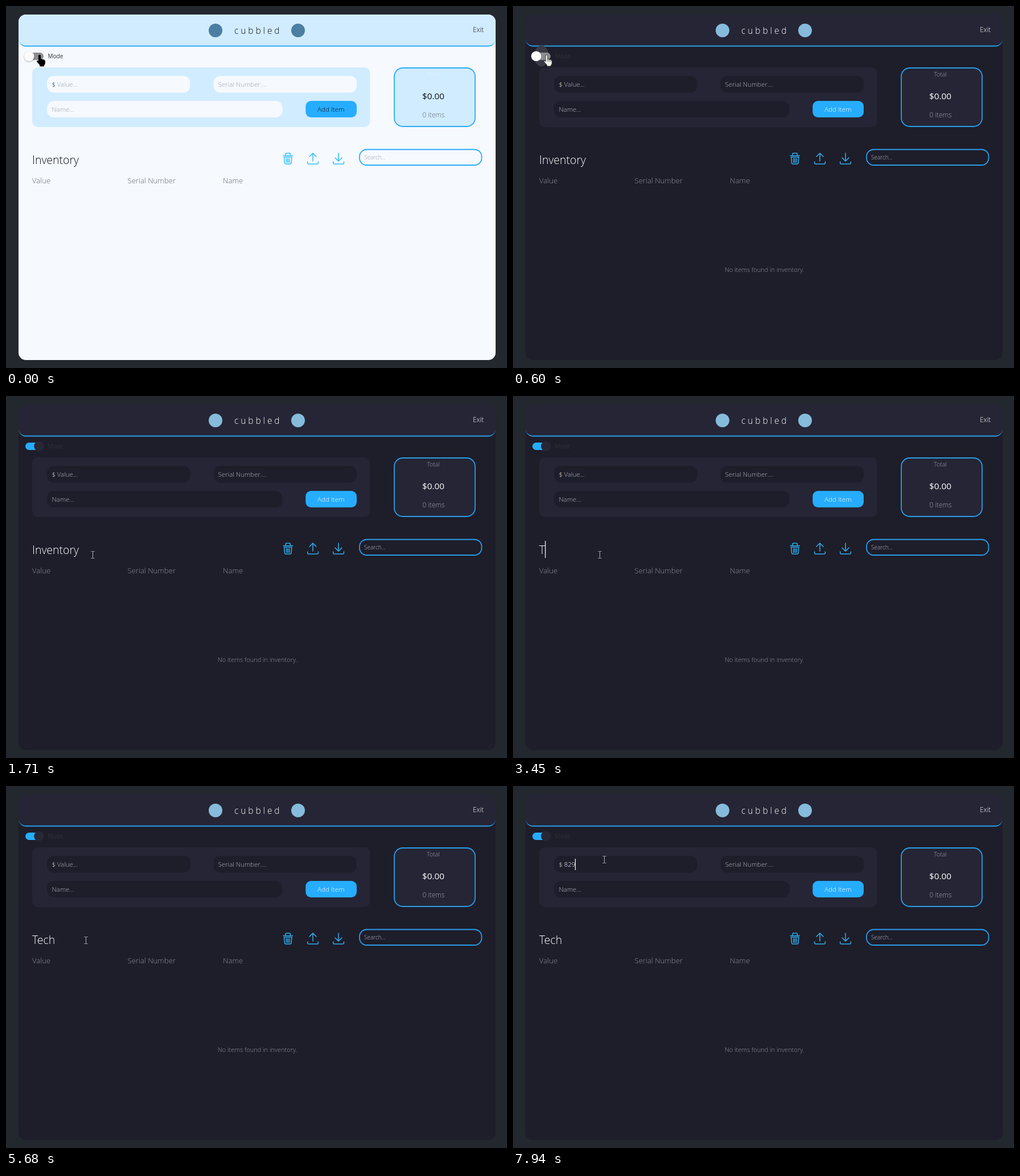
An HTML page for the animation above (8 s loop, 880 by 637 pixels).

```html
<!DOCTYPE html>
<html lang="en">
<head>
<meta charset="utf-8">
<title>Inventory</title>
<style>
html, body { margin: 0; width: 100%; height: 100%; overflow: hidden; background: #23272e; }
svg {
  display: block; width: 880px; height: 637px;
  font-family: "Open Sans", "Noto Sans", sans-serif; font-weight: 300;
  --page: #f6f9fe; --panel: #d1ecff; --accent: #29adf8; --icon: #30bffa;
  --ink: #0c1015; --soft: #5f6a73; --col: #64686e; --hint: #9aa2ab;
  --total: #e6f4ff; --mode: #2b2e33; --dollar: #173a5c; --mark: #4b7ea3;
  --ripple: #dcdfe3; --cur: #000; --edge: #000;
}
svg.dark {
  --page: #1e1d2a; --panel: #252535; --accent: #289fe8; --icon: #2fb0ee;
  --ink: #fff; --soft: #a2a2ac; --col: #8f8f9a; --hint: #b8b8c0;
  --total: #a2a2ac; --mode: #32313b; --dollar: #efe0cc; --mark: #86bbdc;
  --ripple: #3a3a44; --cur: #f0f0e6; --edge: #1e1d2a;
}
text { white-space: pre; fill: var(--ink); }
.page { fill: var(--page); }
.panel { fill: var(--panel); }
.line { stroke: var(--accent); stroke-width: 1.8; }
.hint { fill: var(--hint); font-size: 11.5px; }
.col { fill: var(--col); font-size: 13.1px; }
.mid { text-anchor: middle; }
.icon { fill: none; stroke: var(--icon); stroke-width: 1.5; stroke-linecap: round; stroke-linejoin: round; }
</style>
</head>
<body>
<svg id="app" viewBox="0 0 880 637">
  <rect class="page" x="22" y="15" width="838" height="608" rx="13"/>

  <path class="panel" d="M35 15H847a13 13 0 0 1 13 13V58a13 12 0 0 1-13 12H35a13 12 0 0 1-13-12V28a13 13 0 0 1 13-13z"/>
  <path fill="var(--accent)" d="M22 58a13 13.500 0 0 0 13 13.500H847a13 13.500 0 0 0 13-13.500 13 11.500 0 0 1-13 11.500H35a13 11.500 0 0 1-13-11.500z"/>
  <circle cx="368" cy="43" r="12" fill="var(--mark)"/>
  <circle cx="513" cy="43" r="12" fill="var(--mark)"/>
  <text x="401" y="48.500" font-size="15.500" letter-spacing="3.900">cubbled</text>
  <text x="820" y="46" font-size="12">Exit</text>

  <ellipse id="ripple" fill="var(--ripple)"/>
  <rect id="track" x="34" y="82" width="32" height="13" rx="6.500"/>
  <circle id="shade" cx="40.700" cy="89.400" r="10" fill="#000" opacity=".13"/>
  <circle id="knob" cy="88.300" r="8.800"/>
  <text x="73.500" y="92.300" font-size="10" font-weight="400" style="fill:var(--mode)">Mode</text>

  <rect class="panel" x="46" y="108" width="593.500" height="105" rx="10"/>
  <g class="page">
    <rect x="72" y="123" width="251.500" height="29.500" rx="12"/>
    <rect x="364.500" y="123" width="251.500" height="29.500" rx="12"/>
    <rect x="72" y="167" width="413.500" height="29" rx="12"/>
  </g>
  <text x="80.500" y="142" font-size="11.500" style="fill:var(--dollar)">$</text>
  <text id="value" x="89.700" y="142"></text>
  <text class="hint" x="372.500" y="142">Serial Number....</text>
  <text class="hint" x="80.500" y="186">Name...</text>
  <rect x="526.300" y="167" width="89.700" height="29" rx="9.500" fill="#26adff"/>
  <text class="mid" x="570.700" y="186" font-size="11.700">Add Item</text>

  <rect class="panel line" x="682" y="109" width="142" height="103" rx="15"/>
  <text class="mid" x="750.500" y="124" font-size="10.500" style="fill:var(--total)">Total</text>
  <text class="mid" x="750.500" y="163.500" font-size="15.300" font-weight="400">$0.00</text>
  <text class="mid" x="751" y="196" font-size="11.800" style="fill:var(--soft)">0 items</text>

  <rect id="select" x="46" y="255" height="30" fill="#2f6bb5"/>
  <text id="title" x="46" y="277.500" font-size="19.500"></text>
  <g class="icon">
    <path d="M487 263.500h16.500M491 263v-2q0-2 2-2h4.500q2 0 2 2v2M488.500 266l1 10q.2 2 2 2h7.500q1.800 0 2-2l1-10zM492.700 268.500v7M495.300 268.500v7M497.900 268.500v7"/>
    <path d="M539 273v-14M533 265l6-6 6 6M529.700 274v2q0 2 2 2h14.700q2 0 2-2v-2"/>
    <path d="M584 259v14M578 267l6 6 6-6M574.700 274v2q0 2 2 2h14.700q2 0 2-2v-2"/>
  </g>
  <rect class="page line" x="621" y="252.500" width="214.500" height="27.500" rx="12.500"/>
  <text class="hint" x="629" y="270" style="font-size:10px">Search...</text>

  <text class="col" x="46" y="312.300">Value</text>
  <text class="col" x="213.500" y="312.300">Serial Number</text>
  <text class="col" x="381" y="312.300">Name</text>
  <text id="empty" class="mid" x="441.500" y="468.300" font-size="11" style="fill:#93939d">No items found in inventory.</text>

  <rect id="caret" width="1.200" fill="var(--ink)"/>
  <g id="cursor">
    <g id="hand" transform="scale(.88 .95)">
      <path d="M-2 1a2 2 0 0 1 4 0v6h2.500q1 0 1.200.6h1.800q1 0 1.200.8 2 0 2 2v5l-2 3v1.600h-8v-2l-5.500-6q-1-2 1-2.400l1.800 1.600z"
        fill="var(--cur)" stroke="var(--edge)" stroke-width=".8"/>
      <path d="M2 7v4M5 8v3M8 8.500v3" stroke="var(--edge)" stroke-width=".8"/>
    </g>
    <path id="arrow" d="M0 0v16l3.700-3.500 2.500 5.600 2.400-1-2.500-5.500h5.200z" fill="#f4f4f4" stroke="#111" stroke-width=".8"/>
    <path id="beam" transform="translate(.5 .5)" d="M-3-6h2q1 0 1 1 0-1 1-1h2M0-5v10M-3 6h2q1 0 1-1 0 1 1 1h2"
      fill="none" stroke="#c4c4c2" stroke-width=".9"/>
  </g>
</svg>
<script>
const LOOP = 8000;
const $ = id => document.getElementById(id);
const app = $("app");
const el = {};
for (const id of ["ripple", "track", "shade", "knob", "value", "select", "title",
  "empty", "caret", "cursor", "hand", "arrow", "beam"]) el[id] = $(id);

const set = (node, attrs) => { for (const k in attrs) node.setAttribute(k, attrs[k]); };
const show = (node, on) => node.setAttribute("visibility", on ? "visible" : "hidden");
const span = (t, a, b) => Math.min(1, Math.max(0, (t - a) / (b - a)));
const ease = p => p * p * (3 - 2 * p);
const mix = (a, b, p) => a + (b - a) * p;
const within = (t, ...ranges) => ranges.some(([a, b]) => t >= a && t < b);
const at = (t, steps) => steps.reduce((v, [ms, next]) => t >= ms ? next : v, "");

// Quadratic curve between two points
const curve = (a, c, b, p) => a.map((v, i) =>
  (1 - p) ** 2 * v + 2 * p * (1 - p) * c[i] + p * p * b[i]);

const TITLE = [[0, "Inventory"], [3450, "T"], [3670, "Te"], [3890, "Tec"], [3990, "Tech"], [4090, "Tech "]];
const VALUE = [[0, "Value..."], [6300, ""], [7600, "8"], [7810, "82"], [7940, "829"]];

function pointer(t) {
  if (t < 1300) return curve([59, 87], [110, 200], [212, 268], ease(span(t, 880, 1300)));
  if (t < 5680) {
    const p = span(t, 1300, 1710);
    return curve([212, 268], [180, 298], [152, 279], 1 - (1 - p) ** 2);
  }
  return curve([140, 271], [55, 190], [160, 129], ease(span(t, 5680, 6400)));
}

function cursorKind(x, y) {
  if (x < 67 && y < 97) return "hand";
  const field = y > 123 && y < 152 && x > 72 && x < 323;
  const name = y > 167 && y < 196 && x > 72;
  const heading = y > 254 && y < 290 && x > 46;
  return field || name || heading ? "beam" : "arrow";
}

function drawToggle(t) {
  const p = ease(span(t, 620, 710));
  const on = t >= 640;
  const grow = span(t, 490, 600);
  set(el.knob, { cx: mix(40.7, 58, p), fill: on ? "#272736" : "#fbfbfb" });
  set(el.track, { fill: on ? "#26adff" : "#8d8d8f" });
  show(el.shade, t < 600);
  set(el.ripple, {
    cx: mix(55, 50, grow) + 8 * p, cy: mix(86, 88, grow),
    rx: mix(8, 13, grow), ry: mix(10, 18.5, grow),
    opacity: t < 490 ? 0 : 1 - span(t, 640, 900)
  });
}

function drawText(t) {
  el.title.textContent = at(t, TITLE);
  el.value.textContent = at(t, VALUE);
  el.value.setAttribute("class", "hint");
  el.value.style.fill = t >= 7600 ? "var(--ink)" : "";

  const picked = within(t, [2140, 2230], [3340, 3450]);
  show(el.select, picked);
  if (picked) set(el.select, { width: el.title.getComputedTextLength() });

  const inTitle = within(t, [2050, 2140], [2230, 2750], [3240, 3340], [3450, 4620], [5115, 5680]);
  const inValue = within(t, [6300, 6830], [7310, LOOP]);
  show(el.caret, inTitle || inValue);
  if (inTitle) set(el.caret, { x: 46 + el.title.getComputedTextLength(), y: 255, height: 30 });
  if (inValue) set(el.caret, { x: 89.2 + el.value.getComputedTextLength(), y: 128, height: 20 });
}

function draw(t) {
  const dark = t >= 600;
  app.setAttribute("class", dark ? "dark" : "");
  show(el.empty, dark);
  drawToggle(t);
  drawText(t);
  const [x, y] = pointer(t);
  const kind = cursorKind(x, y);
  for (const k of ["hand", "arrow", "beam"]) show(el[k], k === kind);
  set(el.cursor, { transform: `translate(${Math.round(x)} ${Math.round(y)})` });
}

const start = performance.now();
function tick() {
  draw((performance.now() - start) % LOOP);
  requestAnimationFrame(tick);
}
tick();
</script>
</body>
</html>
```
